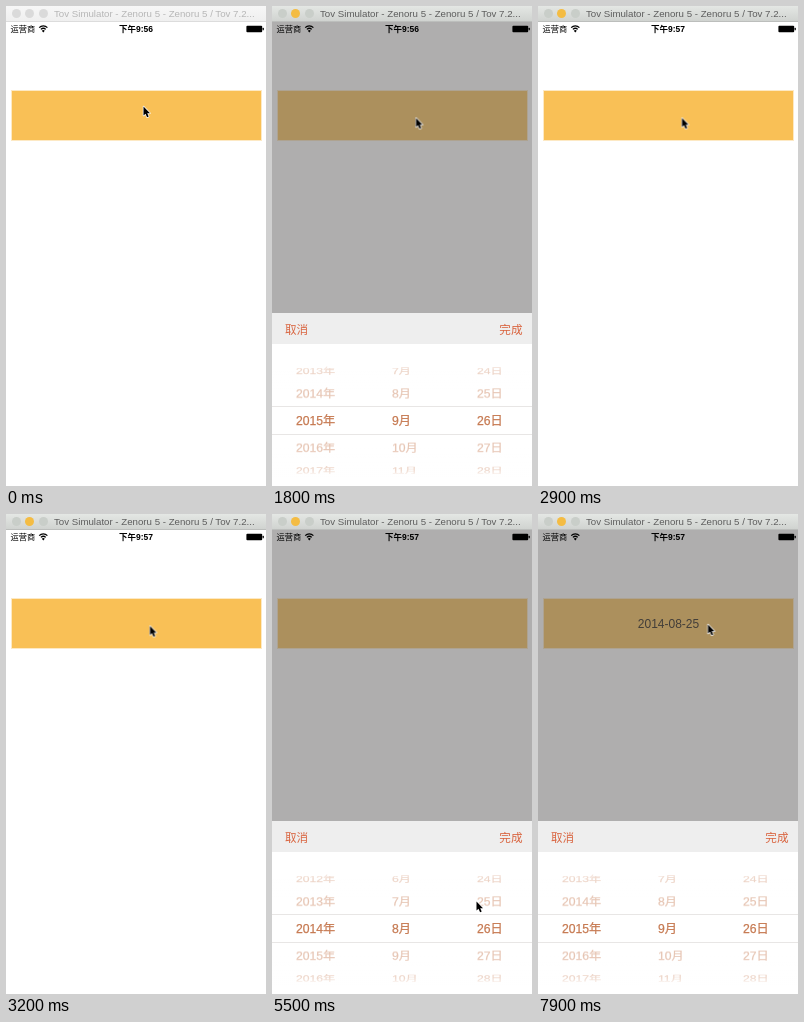
Write an HTML page that moves like this. It is 260 by 480 pixels and loops after 8 s.

```html
<!DOCTYPE html>
<html lang="zh-CN">
<head>
<meta charset="utf-8">
<title>Date picker</title>
<style>
  html, body { margin: 0; width: 100%; height: 100%; overflow: hidden; background: #fff; }
  body { font-family: "Liberation Sans", "Noto Sans CJK SC", "Noto Sans CJK", sans-serif; }
  .stage { position: relative; width: 260px; height: 480px; overflow: hidden; background: #fff; }
  .stage * { position: absolute; white-space: nowrap; }
  .anim { animation: 8s ease-in-out infinite; }
  .switch { animation: 8s step-end infinite; }

  /* window title bar */
  .bar { left: 0; top: 0; width: 260px; height: 15px; background: linear-gradient(#f7f7f7, #efefef);
         border-bottom: 1px solid #dcdcdc; animation-name: bar; }
  .light { top: 3px; width: 9px; height: 9px; border-radius: 50%; background: #dadada; animation-name: light; }
  .mid { animation-name: mid; }
  .title { left: 48px; top: 0; font-size: 9.7px; line-height: 15px; color: #b6b6b6; animation-name: title; }

  /* phone screen */
  .field { left: 6px; top: 85px; width: 249px; height: 49px; background: #f9c056;
           box-shadow: 0 0 0 1px rgba(249, 192, 86, .35); }
  .date { left: 0; width: 100%; top: 0; text-align: center; font-size: 12px; line-height: 50px;
          color: #1c150a; opacity: 0; animation-name: date; }
  .dim { left: 0; top: 16px; width: 260px; height: 464px; background: rgba(102, 100, 100, .52); animation-name: dim; }
  .status { left: 0; top: 16px; width: 260px; height: 14px; line-height: 14px; color: #000; }
  .carrier { left: 4.5px; top: .5px; font-size: 8.2px; }
  .clock { left: 0; width: 260px; text-align: center; font-size: 8.5px; font-weight: bold; }
  .before { animation-name: before; }
  .after { opacity: 0; animation-name: after; }
  .status svg { left: 0; top: 0; }

  /* bottom sheet */
  .sheet { left: 0; top: 307px; width: 260px; height: 183px; background: #fff; animation-name: sheet; }
  .tools { left: 0; top: 0; width: 260px; height: 31px; background: #eee; color: #d9643f;
           font-size: 11.6px; line-height: 33px; }
  .cancel { left: 13px; }
  .done { right: 9.5px; }
  .picker { left: 0; top: 31px; width: 260px; height: 152px; overflow: hidden; }
  .wheel { top: 76.5px; width: 50px; height: 0; transform-style: preserve-3d; }
  .wheel span { left: 0; top: -10px; height: 20px; line-height: 20px; font-size: 12.2px; color: #c67a52;
                -webkit-text-stroke: .25px #c67a52; backface-visibility: hidden;
                transform: rotateX(calc(var(--i) * -23.5deg)) translateZ(68px); }
  .year { left: 24px; animation-name: year; }
  .month { left: 119.5px; animation-name: month; }
  .day { left: 205px; animation-name: day; }
  .fade { left: 0; width: 260px; height: 62px;
          background: linear-gradient(#fff 18px, rgba(255, 255, 255, .7) 26px, rgba(255, 255, 255, .56) 48px); }
  .upper { top: 0; border-bottom: 1px solid #e8e6e5; }
  .lower { top: 90px; height: 61px; transform: scaleY(-1); border-bottom: 1px solid #e8e6e5; }

  .cursor { left: 0; top: 0; transform: translate(137px, 100px); animation-name: cursor; }

  @keyframes bar   { 10%, 100% { background: linear-gradient(#e4e7e4, #d0d3d0); border-color: #bcbebc; } }
  @keyframes light { 10%, 100% { background: #c9cec9; } }
  @keyframes mid   { 10%, 100% { background: #f4bc43; } }
  @keyframes title { 10%, 100% { color: #5c5c5c; } }
  @keyframes before { 0% { opacity: 1; } 36.25%, 100% { opacity: 0; } }
  @keyframes after  { 0% { opacity: 0; } 36.25%, 100% { opacity: 1; } }
  @keyframes date   { 0% { opacity: 0; } 80.625%, 100% { opacity: 1; } }

  @keyframes sheet {
    0%, 11.25%, 31.375%, 46.25%, 85.625%, 93.5% { transform: translateY(183px); }
    16.25%, 26.375%, 51.25%, 80.625%, 98.5%, 100% { transform: none; }
  }
  @keyframes dim {
    0%, 11.25%, 31.375%, 46.25%, 85.625%, 93.5% { opacity: 0; }
    16.25%, 26.375%, 51.25%, 80.625%, 98.5%, 100% { opacity: 1; }
  }

  /* each wheel turns back one row, and resets while the sheet is hidden */
  @keyframes year {
    0%, 56.25%, 90.01%, 100% { transform: rotateX(0deg); }
    60.6%, 90% { transform: rotateX(-23.5deg); }
  }
  @keyframes month {
    0%, 62.5%, 90.01%, 100% { transform: rotateX(0deg); }
    66.25%, 90% { transform: rotateX(-23.5deg); }
  }
  @keyframes day {
    0%, 70%, 90.01%, 100% { transform: rotateX(0deg); }
    74.4%, 90% { transform: rotateX(-23.5deg); }
  }

  @keyframes cursor {
    0%, 1.25% { transform: translate(137px, 100px); }
    3.75% { transform: translate(141px, 118px); }
    6.25%, 51.5% { transform: translate(143.5px, 111.5px); }
    55.6%, 56.25% { transform: translate(45px, 386px); }
    60% { transform: translate(46px, 413px); }
    62%, 62.5% { transform: translate(130px, 386px); }
    65.5% { transform: translate(130px, 412px); }
    68.5%, 70% { transform: translate(204px, 387px); }
    73.5% { transform: translate(206px, 414px); }
    78.5%, 81% { transform: translate(232px, 319px); }
    85%, 90% { transform: translate(223.5px, 313px); }
    93%, 100% { transform: translate(169.5px, 110px); }
  }
</style>
</head>
<body>
<div class="stage">
  <div class="field"><div class="date switch">2014-08-25</div></div>
  <div class="dim anim"></div>

  <div class="status">
    <span class="carrier">运营商</span>
    <span class="clock before switch">下午9:56</span>
    <span class="clock after switch">下午9:57</span>
    <svg width="260" height="14">
      <g fill="none" stroke="#000" stroke-width="1.3">
        <path d="M33.2 5.6a5.8 5.8 0 0 1 8.2 0M34.9 7.4a3.4 3.4 0 0 1 4.8 0"/>
      </g>
      <path d="M37.3 10.4l-1.5-1.6a2.1 2.1 0 0 1 3 0z"/>
      <rect x="240.4" y="3.7" width="15.8" height="6.5" rx="1"/>
      <rect x="256.6" y="5.8" width="1.2" height="2.4" rx=".5"/>
    </svg>
  </div>

  <div class="sheet anim">
    <div class="tools"><span class="cancel">取消</span><span class="done">完成</span></div>
    <div class="picker">
      <div class="wheel year anim" data-value="2015" data-unit="年"></div>
      <div class="wheel month anim" data-value="9" data-unit="月"></div>
      <div class="wheel day anim" data-value="26" data-unit="日"></div>
    </div>
    <div class="picker">
      <div class="fade upper"></div>
      <div class="fade lower"></div>
    </div>
  </div>

  <div class="bar switch">
    <i class="light switch" style="left:5.5px"></i>
    <i class="light mid switch" style="left:19px"></i>
    <i class="light switch" style="left:33px"></i>
    <span class="title switch">Tov Simulator - Zenoru 5 - Zenoru 5 / Tov 7.2...</span>
  </div>

  <svg class="cursor anim" width="12" height="16" overflow="visible">
    <path d="M.5 .5V9.6L2.5 7.8L4.1 11.3L5.7 10.6L4.2 7.3H7Z" fill="#000" stroke="#fff" stroke-width="1.4"
          stroke-linejoin="round" paint-order="stroke"/>
  </svg>
</div>
<script>
  for (const wheel of document.querySelectorAll('.wheel')) {
    const { value, unit } = wheel.dataset;
    for (let i = -4; i <= 3; i++) {
      const row = document.createElement('span');
      row.textContent = +value + i + unit;
      row.style.setProperty('--i', i);
      wheel.append(row);
    }
  }
</script>
</body>
</html>
```
